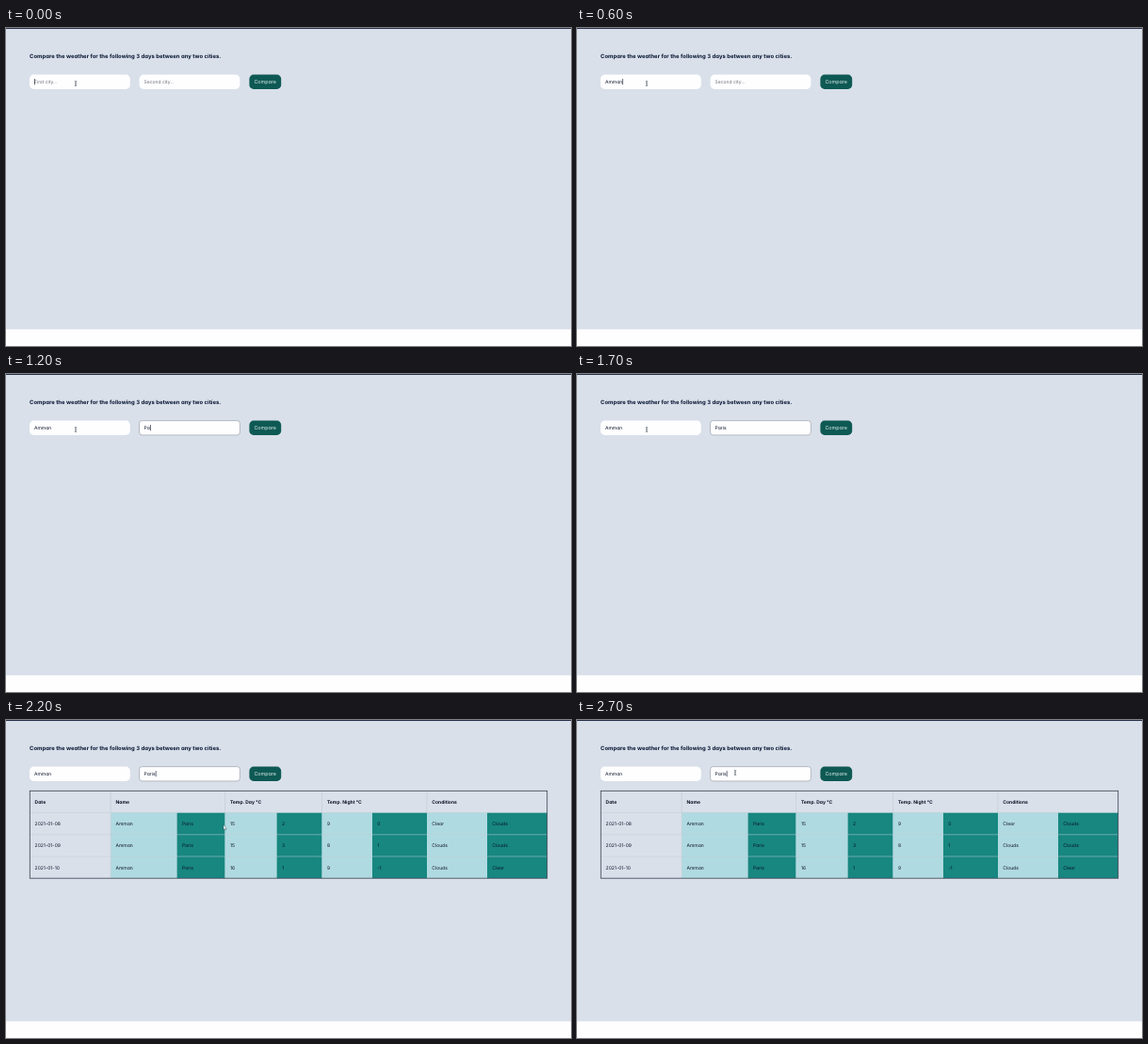
Animation of 600x338 px, one loop 2800 ms. Source, as an HTML page:

```html
<!DOCTYPE html>
<html lang="en">
<head>
<meta charset="utf-8">
<title>City weather comparison</title>
<style>
  html, body { margin: 0; width: 100%; height: 100%; overflow: hidden; background: #fefeff; }
  svg { display: block; width: 100%; height: 100%; }
  text {
    font: 5px Inter, "Open Sans", sans-serif;
    font-feature-settings: "cv11";
    text-rendering: geometricPrecision;
    fill: #0b1226;
    white-space: pre;
  }
  .bold { font-weight: 700; }
  .title { font-size: 5.95px; font-weight: 700; fill: #071633; }
  .label { font-size: 5.4px; fill: #e3eeee; }
  .hint { fill: #6d7178; }
</style>
</head>
<body>
<svg id="stage" viewBox="0 0 600 338"></svg>
<script>
const NS = "http://www.w3.org/2000/svg";
const stage = document.getElementById("stage");

function add(tag, attrs, parent = stage) {
  const el = document.createElementNS(NS, tag);
  for (const k in attrs) el.setAttribute(k, attrs[k]);
  return parent.appendChild(el);
}
const rect = (x, y, width, height, fill, more, parent) =>
  add("rect", { x, y, width, height, fill, ...more }, parent);
function label(x, y, str, cls, parent) {
  const el = add("text", { x, y, class: cls || "" }, parent);
  el.textContent = str;
  return el;
}
const line = (d, stroke, width, parent) =>
  add("path", { d, stroke, "stroke-width": width, fill: "none" }, parent);
const show = (el, on) => el.setAttribute("visibility", on ? "visible" : "hidden");

// Page and form
rect(0, 0, 600, 320.3, "#d9e0ea");
rect(0, 0, 600, 0.9, "#152039");
label(25, 32, "Compare the weather for the following 3 days between any two cities.", "title");

function field(x, hint) {
  const box = rect(x, 49.6, 106.8, 15.3, "#fefeff", { rx: 4.5 });
  const text = label(x + 5, 58.9, hint, "hint");
  const caret = rect(0, 54, 0.6, 6.3, "#0b1226");
  return { x: x + 5, box, hint, text, caret };
}
const first = field(25, "First city...");
const second = field(141.6, "Second city...");
rect(258.4, 49.6, 33.8, 15.3, "#0e5954", { rx: 4.5 });
label(263.4, 58.9, "Compare", "label");

// Result table
const table = add("g", {});
const cols = [25.3, 111.2, 181.6, 232.6, 287.6, 335.6, 389, 447, 511, 574.7];
const rows = [75.3, 98.5, 121.8, 145, 168.2];
const heads = { 0: "Date", 1: "Name", 3: "Temp. Day °C", 5: "Temp. Night °C", 7: "Conditions" };
const data = [
  ["2021-01-08", "Amman", "Paris", "15", "2", "9", "0", "Clear", "Clouds"],
  ["2021-01-09", "Amman", "Paris", "15", "3", "8", "1", "Clouds", "Clouds"],
  ["2021-01-10", "Amman", "Paris", "16", "1", "9", "-1", "Clouds", "Clear"]
];
for (let c = 1; c < 9; c++)
  rect(cols[c], rows[1], cols[c + 1] - cols[c], rows[4] - rows[1], c % 2 ? "#b0dae1" : "#178780", {}, table);
for (const c of [1, 3, 5, 7])
  line(`M${cols[c]} ${rows[0]}V${rows[1]}`, "#c3cad4", 0.6, table);
line(`M${cols[1]} ${rows[1]}V${rows[4]}`, "#c3cad4", 0.5, table);
for (const y of rows.slice(1, 4))
  line(`M${cols[0]} ${y}H${cols[9]}`, "#bdcbd3", 0.5, table);
for (const c in heads) label(cols[c] + 5.3, 88.7, heads[c], "bold", table);
data.forEach((row, r) => row.forEach((str, c) =>
  label(cols[c] + 5.3, rows[r + 1] + 13.6, str, "", table)));
rect(25.3, 75.3, 549.4, 92.9, "none", { stroke: "#3a4250", "stroke-width": 0.8 }, table);

// Pointers
const beam = add("g", {});
line("M-1.2 -2.7Q0 -2.7 0 -1.8V1.8Q0 2.7 -1.2 2.7M1.2 -2.7Q0 -2.7 0 -1.8V1.8Q0 2.7 1.2 2.7", "#555b64", 0.6, beam);
const arrow = add("path", {
  d: "M0 0V5L1.1 4L1.9 5.6L2.6 5.2L1.9 3.7H3.3Z",
  fill: "#fff", stroke: "#303640", "stroke-width": 0.35
});
const trail = add("g", { opacity: 0.55 });
for (const [x, y] of [[74, 59], [81.5, 61.5], [91.5, 65]])
  line(`M${x - 1} ${y - 2}H${x + 1}M${x} ${y - 2}V${y + 2}M${x - 1} ${y + 2}H${x + 1}`, "#8b929c", 0.5, trail);

// [time, first value, second value, focus (0 none, 1, 2)]
const steps = [
  [0, "", "", 1],
  [100, "A", "", 1],
  [200, "Am", "", 1],
  [300, "Amm", "", 1],
  [400, "Amma", "", 1],
  [500, "Amman", "", 1],
  [700, "Amman", "", 2],
  [900, "Amman", "", 0],
  [1000, "Amman", "P", 2],
  [1200, "Amman", "Pa", 2],
  [1300, "Amman", "Pari", 2],
  [1400, "Amman", "Paris", 2],
  [1700, "Amman", "Paris", 0],
  [2000, "Amman", "Paris", 2],
  [2400, "Amman", "Paris", 0],
  [2600, "Amman", "Paris", 2]
];
// [time, x, y]
const path = [[0, 74, 59], [1700, 74, 59], [1800, 91, 65], [2200, 231, 111.5], [2300, 231, 111.5], [2700, 168, 56], [2800, 168, 56]];

function fill(f, value, caretOn) {
  f.text.textContent = value || f.hint;
  f.text.setAttribute("class", value ? "" : "hint");
  const w = value ? f.text.getComputedTextLength() + 0.2 : 0;
  f.caret.setAttribute("x", f.x + w);
  show(f.caret, caretOn);
}

function pointer(t) {
  const i = path.findIndex(p => p[0] > t);
  const [t0, x0, y0] = path[i - 1], [t1, x1, y1] = path[i];
  const k = (t - t0) / (t1 - t0);
  return [x0 + (x1 - x0) * k, y0 + (y1 - y0) * k];
}

let last = -1;
function draw(t) {
  const [, a, b, focus] = steps.filter(s => s[0] <= t).pop();
  fill(first, a, focus === 1);
  fill(second, b, focus === 2);
  second.box.setAttribute("stroke", t >= 700 ? "#8d949e" : "none");
  second.box.setAttribute("stroke-width", 0.6);
  second.box.setAttribute("rx", t >= 700 ? 3 : 4.5);
  show(table, t >= 1800);

  const [x, y] = pointer(t);
  const moving = t === 1800;
  const overField = y < 65;
  for (const el of [beam, arrow]) el.setAttribute("transform", `translate(${x} ${y})`);
  show(trail, moving);
  show(beam, overField && !moving);
  show(arrow, !overField && !moving);
}

function tick(now) {
  const t = Math.floor(now % 2800 / 100) * 100;
  if (t !== last) draw(last = t);
  requestAnimationFrame(tick);
}
const start = performance.now();
draw(0);
requestAnimationFrame(function loop() {
  tick.call(null, Math.max(0, performance.now() - start));
});
</script>
</body>
</html>
```
